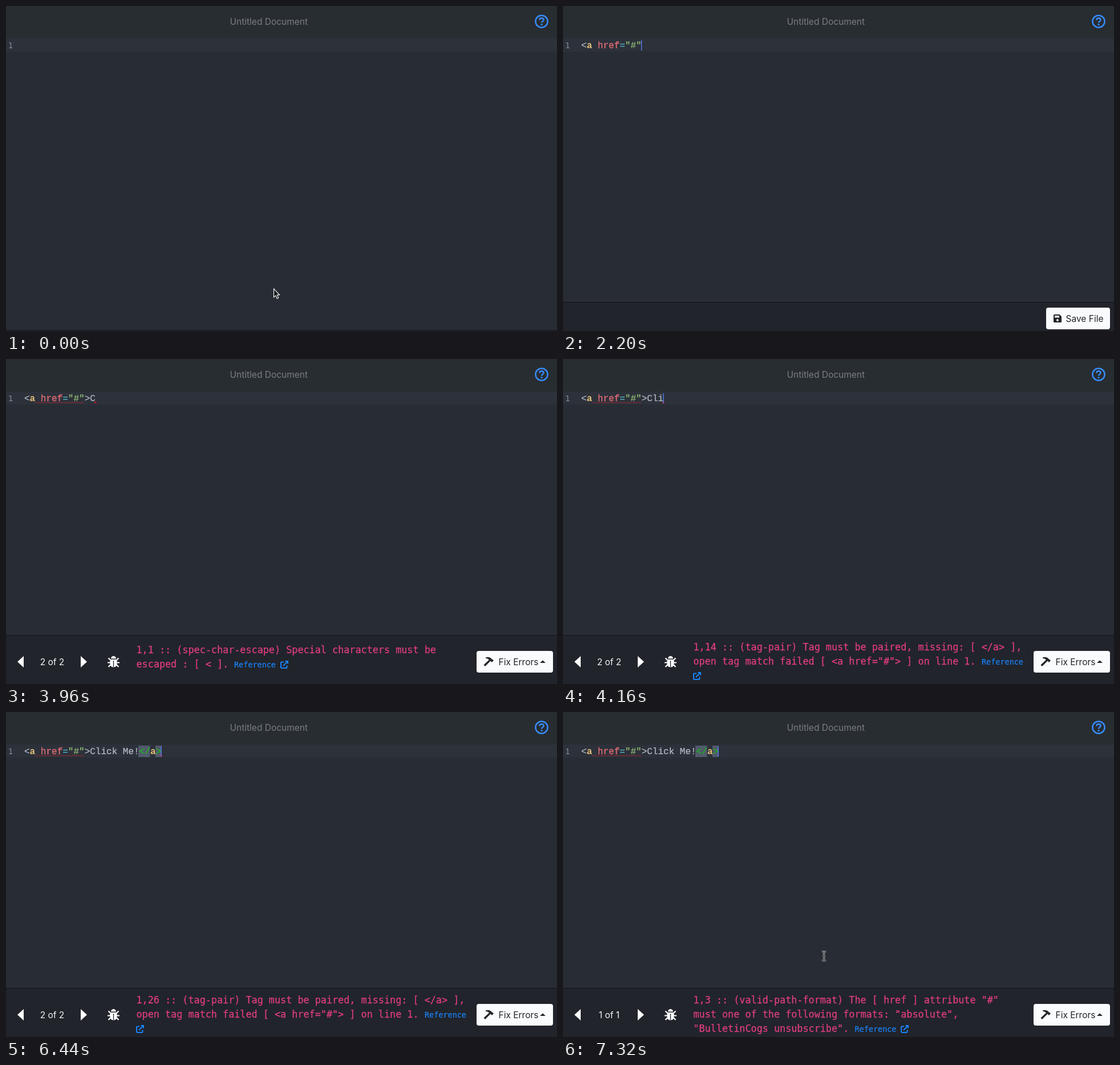
Recreate the animation shown at these times as an HTML page. Size 966 by 570 pixels, loop 7440 ms.

```html
<!DOCTYPE html>
<html lang="en">
<head>
<meta charset="utf-8">
<title>Editor</title>
<style>
html, body { margin: 0; width: 100%; height: 100%; overflow: hidden; background: #282c34; }
svg { display: block; width: 966px; height: 570px; }
text { white-space: pre; }
.ui { font: 15.5px Inter, sans-serif; }
.code { font: 16px "Liberation Mono", monospace; fill: #b6bdc9; stroke: #b6bdc9; stroke-width: .2px; }
.msg { font: 16.8px "DejaVu Sans Mono", monospace; fill: #e03e7e; stroke: #e03e7e; stroke-width: .25px; }
.ref { font: 13.47px "DejaVu Sans Mono", monospace; fill: #1a84fb; stroke: #1a84fb; stroke-width: .2px; }
.num { font: 14px "DejaVu Sans Mono", monospace; fill: #858c99; }
.item { font: bold 16px "Liberation Mono", monospace; fill: #fff; }
.kind { font: italic 12px "Liberation Serif", serif; fill: #a9adb4; }
.tag { fill: #e5c07b; stroke: none; font-weight: bold; }
.attr { fill: #e06c75; stroke: #e06c75; stroke-width: .35px; }
.op { fill: #56b6c2; stroke: #56b6c2; }
.str { fill: #98c379; stroke: #98c379; }
.match { fill: #16bd16; stroke: #16bd16; }
</style>
</head>
<body>
<svg viewBox="0 0 966 570">
  <defs>
    <clipPath id="listClip"><rect x="41" y="79" width="100" height="160"/></clipPath>
    <path id="link" d="M6 2.5H2.2Q1 2.5 1 3.700V11.800Q1 13 2.200 13H10.300Q11.500 13 11.500 11.800V8.500M8.500 1H13V5.500M13 1L5 9" fill="none" stroke="#1a84fb" stroke-width="2"/>
    <path id="beamShape" d="M-3.500-8Q0-8 0-6V6Q0 8-3.500 8M3.500-8Q0-8 0-6V6Q0 8 3.500 8M-2 1H2"/>
  </defs>
  <rect width="966" height="570" fill="#282c34"/>
  <rect width="966" height="57" fill="#282d32"/>
  <rect y="57" width="966" height="23" fill="#2c313a"/>
  <text class="ui" x="392.500" y="33" fill="#7b7e82">Untitled Document</text>
  <circle cx="939" cy="27" r="10.600" fill="none" stroke="#378bfb" stroke-width="2.500"/>
  <path d="M935.300 24.600Q935.500 21.300 939.100 21.300Q942.600 21.500 942.600 24.300Q942.600 26 940.600 27.100Q939.100 28 939.100 29.500" fill="none" stroke="#378bfb" stroke-width="2.500"/>
  <circle cx="939.100" cy="32.500" r="1.600" fill="#378bfb"/>
  <text class="num" x="3.800" y="74">1</text>

  <g id="match" fill="#515a6b">
    <rect x="232" y="59" width="20.500" height="20"/>
    <rect x="262" y="59" width="10.500" height="20"/>
  </g>
  <path id="attrErr" fill="none" stroke="#c9252f" stroke-width=".8"/>
  <path id="endErr" d="M-3 77L0 74.500L3 77.500Z" fill="#e0141c"/>
  <text class="code" id="code" x="32" y="74"></text>
  <rect id="caret" y="60" width="1.300" height="18" fill="#5a80ff"/>

  <g id="list">
    <rect x="41" y="79" width="100" height="161" fill="#15181c"/>
    <rect x="42" y="79" width="98" height="160" fill="#1f2328"/>
    <rect x="42" y="79" width="98" height="21" fill="#b3d4ff"/>
    <g id="items" clip-path="url(#listClip)"></g>
  </g>

  <g id="bar">
    <rect width="966" height="100" fill="#21242b"/>
    <rect id="barEdge" width="966" height="1" fill="#101216"/>
  </g>

  <g id="save">
    <rect x="847" y="529" width="112" height="38" rx="4" fill="#fafbfc"/>
    <path d="M861.500 541H870.500L874 544.500V553.500Q874 555 872.500 555H861.500Q860 555 860 553.500V542.500Q860 541 861.500 541Z" fill="#212529"/>
    <path d="M862 543H870V546.500H862Z" fill="#fafbfc"/>
    <circle cx="867" cy="551" r="2" fill="#fafbfc"/>
    <text class="ui" x="881.500" y="554" fill="#212529">Save File</text>
  </g>

  <g id="errors">
    <path d="M31 521V541L20 531ZM131 521V541L142 531Z" fill="#fff"/>
    <text class="ui" id="count" x="81" y="537" fill="#f4f5f6" text-anchor="middle"></text>
    <g transform="translate(188.500 531)" fill="#fff">
      <path d="M-4.500-5.500A4.500 4.500 0 0 1 4.500-5.500ZM-6-4H6V3Q6 9.500 0 9.500Q-6 9.500-6 3Z"/>
      <path d="M-9-6.500L-5.500-3M9-6.500L5.500-3M-10.500 1.500H-5M10.500 1.500H5M-9 9L-5 5M9 9L5 5" fill="none" stroke="#fff" stroke-width="2.200"/>
      <path d="M0-2V9" stroke="#21242b" stroke-width="1.300"/>
    </g>
    <text class="msg" id="line0" x="228.500"></text>
    <text class="msg" id="line1" x="228.500"></text>
    <text class="msg" id="line2" x="228.500"></text>
    <text class="ref" id="ref">Reference</text>
    <use id="refIcon" href="#link"/>
    <rect x="825" y="512" width="134" height="38" rx="4" fill="#fafbfc"/>
    <path d="M841 523.500Q846 521.500 850 524.500L852 526.500L855 528.500L852 532L849.500 529.500L840 539L837.500 536.500L847 527.500Q844.500 524.500 841 525Z" fill="#212529"/>
    <text class="ui" x="863.500" y="537" fill="#212529">Fix Errors</text>
    <path d="M936 533L941 528.500L946 533Z" fill="#212529"/>
  </g>

  <path id="arrow" d="M0 0V14.800L3.400 11.800L5.600 17L8.200 15.900L6 10.800H10Z" fill="#15171a" stroke="#fff" stroke-width="1.100"/>
  <g id="beam" fill="none">
    <use href="#beamShape" stroke="#e4e5e7" stroke-width="2.700"/>
    <use href="#beamShape" stroke="#15171a" stroke-width="1.200"/>
  </g>
</svg>
<script>
const LOOP = 7440, CHAR = 9.602, LEFT = 32;
const $ = id => document.getElementById(id);
const show = (id, on) => $(id).setAttribute("visibility", on ? "visible" : "hidden");
const move = (id, x, y) => $(id).setAttribute("transform", `translate(${x} ${y})`);
const ramp = (t, a, b) => Math.min(1, Math.max(0, (t - a) / (b - a)));
const ease = p => p * p * (3 - 2 * p);
const mix = (a, b, p) => a + (b - a) * p;
const esc = s => s.replace(/&/g, "&amp;").replace(/</g, "&lt;");

// Time of each keystroke
const source = '<a href="#">Click Me!</a>';
const keys = [440, 680, 1120, 1200, 1280, 1400, 1480, 1600, 1760, 1920, 2200, 3240,
  3960, 4040, 4160, 4240, 4320, 4440, 4840, 4920, 5000, 5520, 5640, 5800, 6000];
const typed = t => keys.filter(k => k <= t).length;

// Token style and end column
const tokens = [["", 1], ["tag", 2], ["", 3], ["attr", 7], ["op", 8], ["str", 11],
  ["", 21], ["match", 23], ["tag", 24], ["match", 25]];

function markup(n) {
  let from = 0, out = "";
  for (const [style, end] of tokens) {
    const part = source.slice(from, Math.min(end, n));
    const name = style === "match" && n < source.length ? "" : style;
    if (part) out += `<tspan class="${name}">${esc(part)}</tspan>`;
    from = end;
    if (from >= n) break;
  }
  return out;
}

function message(t) {
  const n = typed(t - 160);
  if (t >= 6480) return {
    top: 511, ref: [511.5, 561], icon: [592, 549],
    lines: ['1,3 :: (valid-path-format) The [ href ] attribute "#"',
      'must one of the following formats: "absolute",', '"BulletinCogs unsubscribe".']
  };
  if (n > 12) return {
    top: 511, ref: [734, 536], icon: [228, 549],
    lines: [`1,${n + 1} :: (tag-pair) Tag must be paired, missing: [ </a> ],`,
      'open tag match failed [ <a href="#"> ] on line 1.', ""]
  };
  return {
    top: 516, ref: [400, 541], icon: [481, 529],
    lines: ["1,1 :: (spec-char-escape) Special characters must be", "escaped : [ < ].", ""]
  };
}

function drawErrors(t) {
  const m = message(t);
  m.lines.forEach((s, i) => {
    $("line" + i).textContent = s;
    $("line" + i).setAttribute("y", m.top + 25 * i);
  });
  $("ref").setAttribute("x", m.ref[0]);
  $("ref").setAttribute("y", m.ref[1]);
  move("refIcon", ...m.icon);
  $("count").textContent = t < 6480 ? "2 of 2" : "1 of 1";
  $("errors").setAttribute("opacity", ramp(t, 2600, 2800));
}

function drawCode(t) {
  const n = typed(t), end = LEFT + n * CHAR;
  $("code").innerHTML = markup(n);
  const since = t - (n ? keys[n - 1] : 400);
  show("caret", t >= 400 && since % 1060 < 530 && !(t >= 3960 && t < 4000));
  $("caret").setAttribute("x", end - 0.6);
  show("match", n === source.length);
  show("attrErr", n >= 12);
  show("endErr", n >= 12 && t < 6480);
  move("endErr", end, 0);
  show("list", t >= 680 && t < 1120);
}

function drawBar(t) {
  const rise = ease(ramp(t, 600, 800)), grow = ease(ramp(t, 2600, 2800));
  move("bar", 0, mix(mix(567, 519, rise), 484, grow));
  $("barEdge").setAttribute("opacity", rise);
  $("save").setAttribute("opacity", ramp(t, 800, 960) * (t < 2600 ? 1 : 0));
}

function drawMouse(t) {
  const out = ease(ramp(t, 0, 240)), back = ease(ramp(t, 6960, 7320));
  show("arrow", t < 240);
  move("arrow", mix(469.5, 442, out), mix(496, 470, out));
  show("beam", t >= 6960);
  move("beam", mix(490, 457.5, back), mix(466, 428, back));
}

function render(t) {
  drawCode(t);
  drawBar(t);
  drawErrors(t);
  drawMouse(t);
}

["a", "abbr", "acronym", "address", "applet", "area", "article", "aside"].forEach((s, i) => {
  const y = 95 + 21 * i, first = i === 0;
  $("items").innerHTML += `<text class="kind" x="45" y="${y - 1}"${first ? ' style="fill:#56677f"' : ""}>t</text>` +
    `<text class="item" x="57" y="${y}"${first ? ' style="fill:#111"' : ""}>` +
    `<tspan text-decoration="underline">a</tspan>${s.slice(1)}</text>`;
});

let wave = "M51 77.5";
for (let x = 53, up = true; x <= 137; x += 2, up = !up) wave += `L${x} ${up ? 75.5 : 77.5}`;
$("attrErr").setAttribute("d", wave);

const start = performance.now();
function frame() {
  render((performance.now() - start) % LOOP);
  requestAnimationFrame(frame);
}
frame();
</script>
</body>
</html>
```
